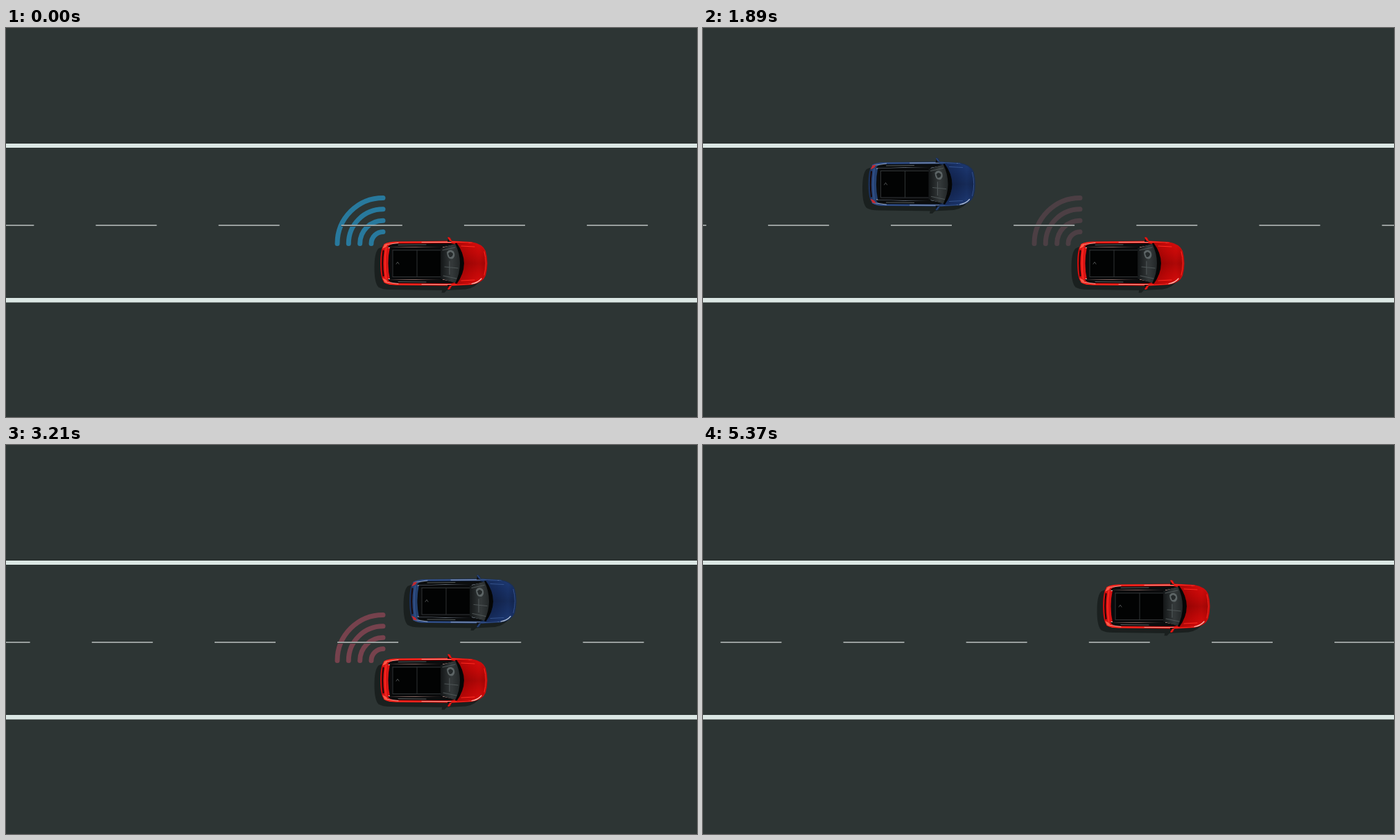
These frames come from a looping animation (997 px wide and 562 px high, 5.4 s). An HTML page with a canvas:

```html
<!DOCTYPE html>
<html lang="en">
<head>
<meta charset="utf-8">
<title>Lane change</title>
<style>
html, body { margin: 0; width: 100%; height: 100%; overflow: hidden; background: #2d3534; }
canvas { display: block; }
</style>
</head>
<body>
<canvas id="stage" width="997" height="562"></canvas>
<script>
const ctx = document.getElementById('stage').getContext('2d');
const STEP = 30, STEPS = 180;

// Cars are drawn around this centre.
const CX = 617.5, CY = 340;

const RED = {
  side: '#c90d0d', edge: '#ff2a20', shine: '#ffc0b4', rear: '#d81414', lamp: '#ff5a48',
  hood: ['#8c0404', '#b80606', '#d60d0c', '#a80404']
};
const BLUE = {
  side: '#1a3058', edge: '#34528c', shine: '#b4c2d8', rear: '#24406f', lamp: '#c22a30',
  hood: ['#101f42', '#152a5a', '#1e3a74', '#12244c']
};

// [step, position] knots
const ROAD = [[0, 0], [47, 526], [80, 997.5], [107, 1422.9], [128, 1799.6], [152, 2248.7], [179, 2761.4]];
const PASS = [[18, -717], [47, -442], [80, -160], [107, 42], [128, 366], [136, 496]];

function slope(k, i) {
  const a = k[Math.max(i - 1, 0)], b = k[Math.min(i + 1, k.length - 1)];
  return (b[1] - a[1]) / (b[0] - a[0]);
}

// Smooth curve through the knots.
function track(k, n) {
  let i = 0;
  while (i < k.length - 2 && n > k[i + 1][0]) i++;
  const [t0, p0] = k[i], [t1, p1] = k[i + 1];
  const h = t1 - t0, u = Math.min(1, Math.max(0, (n - t0) / h)), v = 1 - u;
  return p0 * (1 + 2 * u) * v * v + slope(k, i) * h * u * v * v +
    p1 * u * u * (3 - 2 * u) - slope(k, i + 1) * h * u * u * v;
}

function shape(fill, path) {
  ctx.fillStyle = fill;
  ctx.fill(new Path2D(path));
}

function line(color, width, path) {
  ctx.strokeStyle = color;
  ctx.lineWidth = width;
  ctx.stroke(new Path2D(path));
}

function ramp(x0, y0, x1, y1, colors) {
  const g = ctx.createLinearGradient(x0, y0, x1, y1);
  colors.forEach((c, i) => g.addColorStop(i / (colors.length - 1), c));
  return g;
}

const BODY = 'M546 312Q553 308 566 308.5L644 307.5L672 309Q688 312 692 322Q697 340 692 358' +
  'Q688 368 672 371L644 372.5L566 371.5Q553 372 546 368Q540 362 540 340Q540 318 546 312Z';
const HOOD = 'M650 310L672 310.5Q687 313 691 323Q695 340 691 357Q687 367 672 369.5L650 370.5Q672 340 650 310Z';
const GLASS = 'M627 318L651 311Q671 340 651 369L627 362Z';

// One long side of the car; the other is its mirror image.
function side(p) {
  shape('#0b0d0e', 'M551 317Q553 312 562 311.5L642 311L650 313L628 318.5L556 319Z');
  line(p.edge, 1.6, 'M546 313Q552 309.3 566 309.6L646 309L672 310.5');
  line(p.shine, 1, 'M552 317.5L592 316.5L630 317L648 313.5');
  line(p.shine, .8, 'M548 313L566 310.4M600 309.6L642 309.4M668 310.5Q682 313 687 320');
  line('#6d7373', .8, 'M566 313.5L606 313');
  shape(p.lamp, 'M543 319L546 313L551 312L549 316Z');
  shape('#101010', 'M637 309L638 304L643 309Z');
  shape(p.side, 'M637 303Q638 301 641 303L643.5 308L640 308Z');
  line(p.edge, 1, 'M638.5 303L642 307.5');
}

function car(p, dx, dy, angle) {
  ctx.save();
  ctx.translate(CX + dx, CY + dy);
  ctx.rotate(angle);
  ctx.translate(-CX, -CY);
  ctx.lineCap = 'round';

  ctx.save();
  ctx.translate(-8.5, 6.5);
  shape('#1a201f', BODY);
  shape('#1a201f', 'M638 371L646 371L641 376L637 376Z');
  ctx.restore();

  shape(p.side, BODY);
  shape(p.rear, 'M546 313L554 314Q549 340 554 366L546 367Q538 340 546 313Z');
  line('#180606', 2, 'M544.5 322Q542 340 544.5 358');
  line(p.edge, 1.6, 'M548.5 318Q545.5 340 548.5 362');

  side(p);
  ctx.save();
  ctx.translate(0, 680);
  ctx.scale(1, -1);
  side(p);
  ctx.restore();

  shape('#0a0b0c', 'M554 317Q549 340 554 363L630 364L630 316Z');
  shape('#020303', 'M558 321H627V359H558Z');
  line('#35393a', .9, 'M558 321H627M558 359.5H627M558 321V359M593 321V359');
  line('#55595a', .9, 'M563 341L565 338L567 341');

  shape(ramp(626, 0, 660, 0, ['#111415', '#34393a', '#1b1f20']), GLASS);
  shape('#050606', 'M648 311L653 310Q673 340 653 370L648 369Q662 340 648 311Z');
  line('#4e5556', 1.2, 'M630 321L648 317M631 358L650 362M633 345L652 347M640 337V356');
  shape('#5d6566', 'M636 324Q640 318 646 323Q649 329 645 333Q637 336 636 324Z');
  shape('#252a2b', 'M638 326Q641 321 645 326Q645 331 640 331Z');

  shape(ramp(0, 310, 0, 370, [p.hood[2], p.hood[1], p.hood[0], p.hood[1], p.hood[2]]), HOOD);
  ctx.globalAlpha = .45;
  shape(ramp(655, 0, 696, 0, p.hood), HOOD);
  ctx.globalAlpha = 1;
  line(p.edge, 1, 'M690 323Q694.5 340 690 357');
  line(p.edge, 1.2, 'M657 315L676 316M657 365L676 364');
  line(p.shine, 1.2, 'M672 369.5Q681 368 686 362');
  ctx.restore();
}

function waves(n) {
  if (n >= 140) return;
  const d = n % 40;
  const a = Math.abs(1 - d / 20);
  const alert = n >= 60 && n < 116;
  ctx.save();
  ctx.globalAlpha = a;
  ctx.strokeStyle = alert ? `rgb(255,${140 * (1 - a)},${190 * (1 - a)})` : '#28799d';
  ctx.lineWidth = 7;
  ctx.lineCap = 'round';
  for (const r of [17, 33.3, 49.7, 66]) {
    ctx.beginPath();
    ctx.arc(544, 311.5, r, Math.PI, Math.PI * 1.5);
    ctx.stroke();
  }
  ctx.restore();
}

function dashes(n) {
  const gap = 177.15;
  const first = ((129.5 - track(ROAD, n)) % gap + gap) % gap - gap;
  for (let x = first; x < 997; x += gap) {
    ctx.fillStyle = '#222928';
    ctx.fillRect(x, 286, 88, 1);
    ctx.fillStyle = '#a3aaa9';
    ctx.fillRect(x, 284.2, 88, 1.9);
  }
}

function draw(n) {
  ctx.fillStyle = '#2d3534';
  ctx.fillRect(0, 0, 997, 562);
  ctx.fillStyle = '#dbe7e4';
  ctx.fillRect(0, 167, 997, 6);
  ctx.fillRect(0, 390, 997, 6.5);
  waves(n);
  dashes(n);
  if (n > 18 && n < 136) car(BLUE, track(PASS, n), -114.5, 0);
  const u = Math.min(1, Math.max(0, (n - 140) / 30));
  const e = u * u * (3 - 2 * u);
  car(RED, 37 * e, -107 * e, -.26 * Math.sin(Math.PI * u));
}

const start = performance.now();
function tick() {
  draw(Math.floor((performance.now() - start) / STEP) % STEPS);
  requestAnimationFrame(tick);
}
tick();
</script>
</body>
</html>
```
